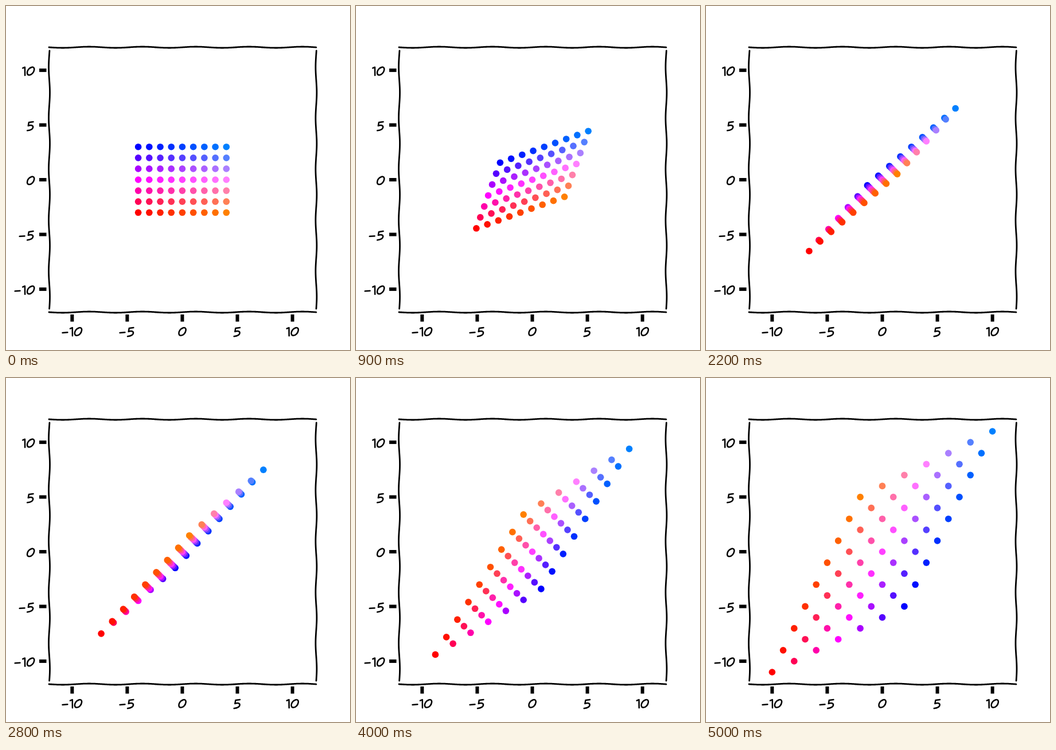
Write an HTML page with a canvas that moves like this. It is 600 by 600 pixels and loops after 5100 ms.

```html
<!DOCTYPE html>
<html lang="en">
<head>
<meta charset="utf-8">
<title>Linear map of a grid</title>
<style>
html, body { margin: 0; width: 100%; height: 100%; overflow: hidden; background: #fff; }
canvas { display: block; }
</style>
</head>
<body>
<canvas id="plot" width="600" height="600" role="img" aria-label="Grid of points, axes from -10 to 10"></canvas>
<script>
const ctx = document.getElementById('plot').getContext('2d');
const STEP = 100, STEPS = 51;
const LEFT = 75, RIGHT = 540.5, TOP = 72, BOTTOM = 534;
const toX = x => 307.5 + x * 465 / 24.2;
const toY = y => 303 - y * 462 / 24.2;

// Hand-lettered glyphs: [advance, pen path]
const glyphs = {
  '-': [13, 'M1.2 10.4L10 9.8'],
  '0': [15, 'M8.6 1.9C4 3.5 1.3 8 1.5 11.8C1.8 16.6 7.2 16.2 10.8 12.3C14 8.8 14.9 3.2 12 1.8C10.6 1.2 8.8 1.7 7.4 2.9'],
  '1': [8, 'M1.6 3.2L5.4 1.6L5.6 15.8'],
  '5': [15, 'M12 1.4L4.4 2.5L3.3 8.4C8 6.6 12 7.6 11.6 11C11.2 14.4 6.5 16.3 1.6 16.8']
};
for (const glyph of Object.values(glyphs)) glyph[1] = new Path2D(glyph[1]);

// align: 0.5 centres the label on x, 1 ends it there
function drawLabel(value, x, y, align) {
  const chars = [...String(value)];
  const width = chars.reduce((sum, c) => sum + glyphs[c][0], 0);
  ctx.save();
  ctx.lineWidth = 2.5;
  ctx.translate(x - width * align, y);
  for (const c of chars) {
    ctx.stroke(glyphs[c][1]);
    ctx.translate(glyphs[c][0], 0);
  }
  ctx.restore();
}

function drawWavyLine(from, to, pointAt) {
  ctx.beginPath();
  for (let s = from; s <= to; s += 2) ctx.lineTo(...pointAt(s));
  ctx.stroke();
}

function drawAxes() {
  ctx.strokeStyle = ctx.fillStyle = '#000';
  ctx.lineCap = ctx.lineJoin = 'round';
  ctx.lineWidth = 2.8;
  for (const y of [TOP, BOTTOM])
    drawWavyLine(75, 541, s => [s, y - Math.cos((s - 145) / 93 * 2 * Math.PI)]);
  for (const x of [LEFT, RIGHT])
    drawWavyLine(78, 529, s => [x + 0.5 + Math.cos((s - 151) / 89 * 2 * Math.PI), s]);
  for (let v = -10; v <= 10; v += 5) {
    ctx.fillRect(toX(v) - 3, 538, 6, 12.5);
    ctx.fillRect(58, toY(v) - 3, 12.5, 6);
    drawLabel(v, toX(v), 559.5, 0.5);
    drawLabel(v, 50.5, toY(v) - 7, 1);
  }
}

// Shear from the identity to [[1, 2], [2, 1]]
function drawPoints(shear) {
  for (let x = -4; x <= 4; x++) {
    for (let y = 3; y >= -3; y--) {
      const red = 255 * Math.min(1, 1 - y / 3);
      const green = 255 * (x + 4) / 16;
      const blue = 255 * Math.min(1, 1 + y / 3);
      ctx.fillStyle = `rgb(${Math.round(red)}, ${Math.round(green)}, ${Math.round(blue)})`;
      ctx.beginPath();
      ctx.arc(toX(x + shear * y), toY(y + shear * x), 5.83, 0, 2 * Math.PI);
      ctx.fill();
    }
  }
}

function draw() {
  const step = Math.floor(performance.now() / STEP) % STEPS;
  ctx.fillStyle = '#fff';
  ctx.fillRect(0, 0, 600, 600);
  drawAxes();
  drawPoints(2 * step / (STEPS - 1));
  requestAnimationFrame(draw);
}
draw();
</script>
</body>
</html>
```
